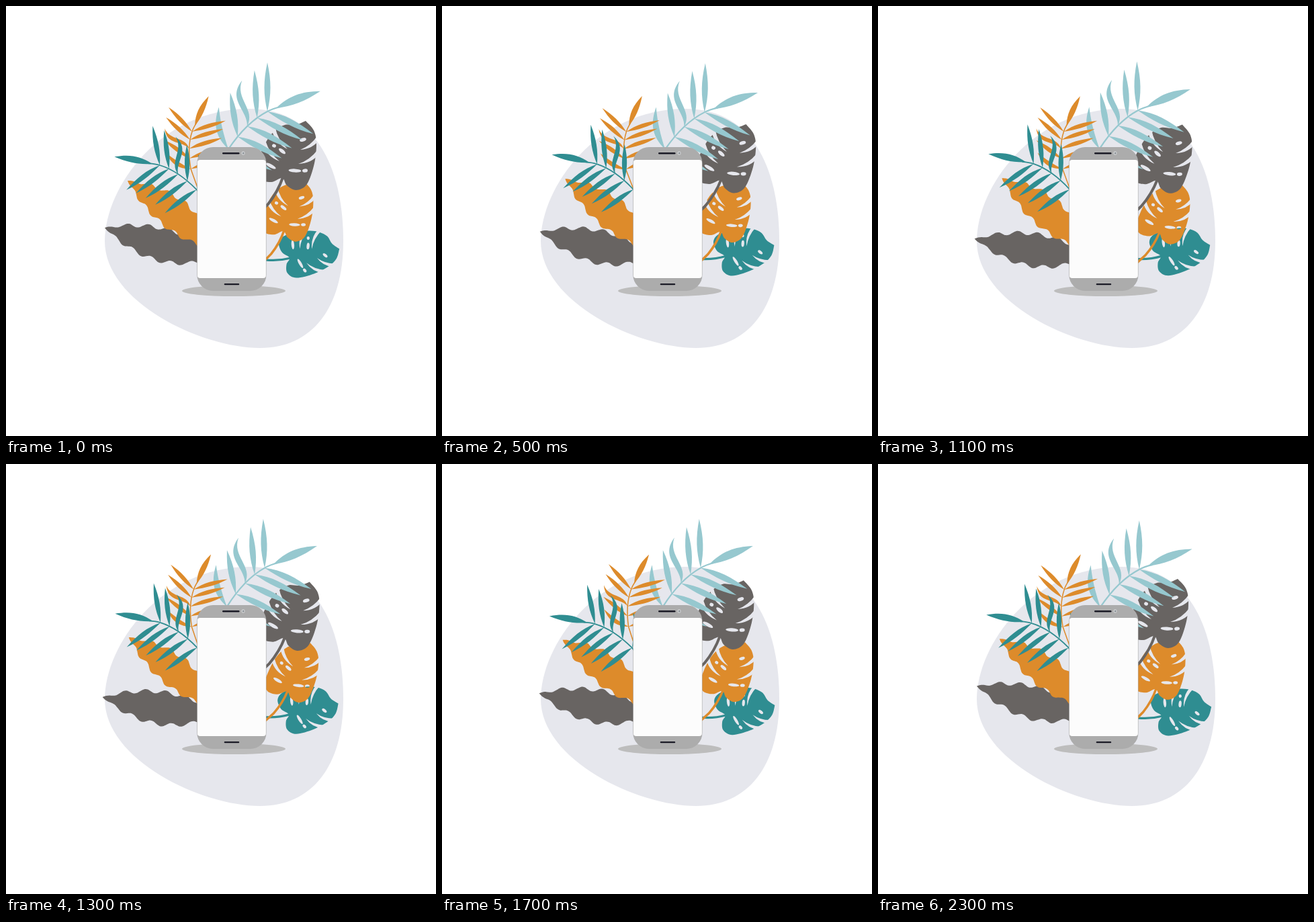
Write an HTML page with a canvas that moves like this. It is 640x640 px and loops after 2.4 s.

```html
<!DOCTYPE html>
<html lang="en">
<head>
<meta charset="utf-8">
<title>Phone and leaves</title>
<style>
html, body { margin: 0; width: 100%; height: 100%; overflow: hidden; background: #fff; }
canvas { display: block; width: 100vw; height: 100vh; }
</style>
</head>
<body>
<canvas id="stage"></canvas>
<script>
const SIZE = 640, LOOP = 2400, STEP = 100, RAD = Math.PI / 180;
const SKY = '#96c8cf', TEAL = '#2f8d91', ORANGE = '#dd8b2b', GREY = '#686462', MIST = '#e6e7ed';
const canvas = document.getElementById('stage');
const ctx = canvas.getContext('2d');
const ratio = window.devicePixelRatio || 1;
canvas.width = canvas.height = SIZE * ratio;

// Eases from rest through each [time, degrees] key and back to rest.
function sway(keys, t) {
  const stops = [[0, 0], ...keys, [LOOP, 0]];
  const i = stops.findIndex(([time]) => time > t);
  const [t0, a] = stops[i - 1], [t1, b] = stops[i];
  return a + (b - a) * (1 - Math.cos(Math.PI * (t - t0) / (t1 - t0))) / 2;
}

// Smooth outline through points, with a sharp corner at the first one.
function outline(points) {
  const p = [...points, points[0]], last = p.length - 1;
  const path = new Path2D();
  path.moveTo(...p[0]);
  for (let i = 0; i < last; i++) {
    const a = p[Math.max(i - 1, 0)], b = p[i], c = p[i + 1], d = p[Math.min(i + 2, last)];
    path.bezierCurveTo(b[0] + (c[0] - a[0]) / 6, b[1] + (c[1] - a[1]) / 6,
      c[0] - (d[0] - b[0]) / 6, c[1] - (d[1] - b[1]) / 6, ...c);
  }
  path.closePath();
  return path;
}

// Slim blade; low and high bend its two halves sideways.
function blade(path, x, y, len, deg, w, low = 0, high = 0) {
  const c = Math.cos(deg * RAD), s = Math.sin(deg * RAD), h = w / 1.5;
  const at = (f, off) => [x + c * len * f - s * off, y + s * len * f + c * off];
  path.moveTo(x, y);
  path.bezierCurveTo(...at(.34, low + h), ...at(.62, high + h), ...at(1, 0));
  path.bezierCurveTo(...at(.62, high - h), ...at(.34, low - h), x, y);
}

// Palm frond: five pairs of blades along a curved stem plus one at the end.
function makeFrond() {
  const path = new Path2D();
  const stem = new Path2D('M-80 105L-58 56Q-31 16 0 0Q7 -4 20 -7');
  const along = (a, b, c, u) => a * (1 - u) ** 2 + 2 * b * u * (1 - u) + c * u * u;
  blade(path, 13, -5, 70.5, -21, 12, -2, -2);
  for (let k = 0; k < 5; k++) {
    const u = 1 - k / 4;
    const x = along(-58, -31, 0, u), y = along(56, 16, 0, u);
    const curl = k === 2 ? [10, -20] : k === 4 ? [-8, -9] : [0, 0];
    blade(path, x, y, 73 - 2.2 * k, -90 - 3.2 * k, 9, ...curl);
    blade(path, x, y, 76 - k, 26, 9, -2, 0);
  }
  return () => {
    ctx.lineWidth = 2.2;
    ctx.stroke(stem);
    ctx.fill(path);
  };
}

// Long leaf with rippled edges, tip at the origin.
function makeWavy() {
  const length = 180, points = [];
  const half = (s, w) => w * Math.sin(Math.PI * s / length) ** .9
    + 3 * Math.min(1, s / 25) * Math.cos((s - 62) / 30 * 2 * Math.PI);
  for (let s = 0; s < length; s += 5) points.push([s, -half(s, 20)]);
  for (let s = length; s > 0; s -= 5) points.push([s, half(s, 28)]);
  const path = outline(points);
  return () => ctx.fill(path);
}

// Heart-shaped leaf with cuts and holes, stem joint at the origin.
function makeMonstera() {
  const body = outline([[35, -85], [47, -71], [51, -52], [48, -22], [37, 9], [21, 18], [7, 11],
    [0, 0], [-16, 6], [-33, 2], [-39, -12], [-33, -34], [-22, -57], [-10, -71], [4, -79], [20, -79]]);
  const stem = new Path2D('M1 -1Q-6 20 -21 39L-56 74');
  const mask = new Path2D();
  mask.rect(-200, -200, 400, 400);

  const cuts = [[54, -60, 27, -42], [54, -39, 24, -21], [-13, -74, 8, -43], [-27, -53, -4, -25]];
  for (const [x, y, ex, ey] of cuts) {
    const dx = ex - x, dy = ey - y, len = Math.hypot(dx, dy);
    const nx = -dy / len * 3, ny = dx / len * 3, bend = Math.sign(dx) * .2;
    const mx = (x + ex) / 2 - dy * bend, my = (y + ey) / 2 + dx * bend;
    mask.moveTo(x + nx, y + ny);
    mask.quadraticCurveTo(mx + nx, my + ny, ex, ey);
    mask.quadraticCurveTo(mx - nx, my - ny, x - nx, y - ny);
    mask.closePath();
  }

  const holes = [[31, -57, 10, -18], [0, -40, 12, 38], [-12, -48, 6, 25],
    [-17, -18, 17, 28], [19, -11, 19, 3], [34, -11, 8, -5]];
  for (const [x, y, len, deg] of holes) {
    const hole = new Path2D();
    hole.ellipse(x, y, len / 2, 2.6, deg * RAD, 0, Math.PI * 2);
    mask.addPath(hole);
  }

  return () => {
    ctx.lineWidth = 4;
    ctx.stroke(stem);
    ctx.clip(mask, 'evenodd');
    ctx.fill(body);
  };
}

const frond = makeFrond(), wavy = makeWavy(), monstera = makeMonstera();

// Back to front: at = origin, turn in degrees, sx and sy = scale.
const plants = [
  { draw: monstera, color: TEAL, at: [422, 375], turn: 57.3, sx: .82, sy: .82,
    pivot: [352, 405], keys: [[700, -2.7]] },
  { draw: monstera, color: ORANGE, at: [413, 335], turn: 0, sx: .87, sy: .87,
    pivot: [355, 430], keys: [[1400, 3.3]] },
  { draw: monstera, color: GREY, at: [411, 256], turn: 0, sx: 1, sy: 1,
    pivot: [318, 342], keys: [[700, 2.7]] },
  { draw: frond, color: SKY, at: [389, 157], turn: 0, sx: 1, sy: 1,
    pivot: [309, 286], keys: [[500, .8], [1500, -2]] },
  { draw: wavy, color: GREY, at: [147, 330], turn: 14, sx: 1, sy: 1,
    pivot: [308, 371], keys: [[1250, -6]] },
  { draw: wavy, color: ORANGE, at: [181, 260], turn: 38, sx: .95, sy: -.95,
    pivot: [301, 363], keys: [[900, 2.2], [1850, -1]] },
  { draw: frond, color: ORANGE, at: [277, 187], turn: -44, sx: .69, sy: .69,
    pivot: [292, 310], keys: [[750, -1.65], [1600, 2.2]] },
  { draw: frond, color: TEAL, at: [229, 237], turn: -10.4, sx: -.815, sy: .815,
    pivot: [301, 324], keys: [[900, 2.1], [1700, -.85]] }
];

function drawPlant({ draw, color, at, turn, sx, sy, pivot: [px, py], keys }, t) {
  ctx.save();
  ctx.translate(px, py);
  ctx.rotate(sway(keys, t) * RAD);
  ctx.translate(at[0] - px, at[1] - py);
  ctx.rotate(turn * RAD);
  ctx.scale(sx, sy);
  ctx.fillStyle = ctx.strokeStyle = color;
  draw();
  ctx.restore();
}

const blob = new Path2D('M362 153C470 153 502 255 502 350C502 450 455 509 378 509'
  + 'C290 509 147 440 147 350C147 270 230 153 362 153Z');

function box(color, x, y, w, h, r) {
  ctx.fillStyle = color;
  ctx.beginPath();
  ctx.roundRect(x, y, w, h, r);
  ctx.fill();
}

function disc(color, x, y, rx, ry) {
  ctx.fillStyle = color;
  ctx.beginPath();
  ctx.ellipse(x, y, rx, ry, 0, 0, Math.PI * 2);
  ctx.fill();
}

function drawPhone() {
  disc('#bdbdbd', 339, 424, 77, 8);
  box('#acacac', 284.3, 210, 103.2, 214, 24);
  box('#fcfcfc', 284.9, 229, 102, 176, 4);
  box('#1b1b26', 322, 218, 25.5, 2.4, 1.2);
  box('#1b1b26', 324.7, 413, 22.5, 2.3, 1.1);
  disc('#d0d2d4', 353, 219, 2.5, 2.8);
  disc('#8b9195', 353.2, 219, 1.3, 1.5);
}

let start;
function render(now) {
  start ??= now;
  const t = Math.floor((now - start) % LOOP / STEP) * STEP;
  ctx.setTransform(canvas.width / SIZE, 0, 0, canvas.height / SIZE, 0, 0);
  ctx.fillStyle = '#fff';
  ctx.fillRect(0, 0, SIZE, SIZE);
  ctx.fillStyle = MIST;
  ctx.fill(blob);
  plants.forEach(p => drawPlant(p, t));
  drawPhone();
  requestAnimationFrame(render);
}
requestAnimationFrame(render);
</script>
</body>
</html>
```
